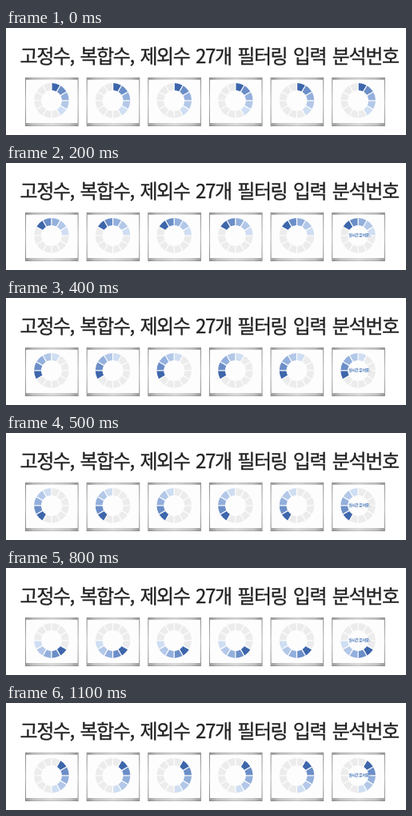
Recreate the animation shown at these times as an HTML page. Size 500 px wide and 134 px high, loop 1200 ms.

```html
<!DOCTYPE html>
<html lang="ko">
<head>
<meta charset="utf-8">
<style>
  html, body { margin: 0; width: 100%; height: 100%; overflow: hidden; background: #fff; }
  svg { display: block; width: 500px; height: 134px; }
  text { font-family: "Noto Sans CJK KR", "Noto Sans CJK", sans-serif; }
  .title {
    font-size: 24px; letter-spacing: -1.4px; word-spacing: 2.3px;
    fill: #222; stroke: #222; stroke-width: .35px;
  }
  .status { font-size: 10px; font-weight: 700; letter-spacing: -1px; fill: #4d7ab8; text-anchor: middle; }
</style>
</head>
<body>
<svg id="stage" viewBox="0 0 500 134">
  <defs>
    <linearGradient id="bar">
      <stop offset="0" stop-color="#858585"/>
      <stop offset=".15" stop-color="#b5b5b5"/>
      <stop offset=".5" stop-color="#d2d2d2"/>
      <stop offset=".85" stop-color="#b5b5b5"/>
      <stop offset="1" stop-color="#858585"/>
    </linearGradient>
    <linearGradient id="side" x2="0" y2="1">
      <stop offset="0" stop-color="#858585"/>
      <stop offset=".5" stop-color="#b4b4b4"/>
      <stop offset="1" stop-color="#858585"/>
    </linearGradient>
  </defs>
  <text class="title" x="17.5" y="43.8">고정수, 복합수, 제외수 27개 필터링 입력 분석번호</text>
</svg>
<script>
const stage = document.getElementById('stage');
const SEGMENTS = 12, STEP = 100, OUTER = 21.8, INNER = 13;
const PITCH = 76.65, WIDTH = 66.6, HEIGHT = 61;
const BLUES = ['#3d66ab', '#6b8ec8', '#93afdc', '#b3c8e8', '#cfdef2'];
const GREY = '#ececec';

function add(parent, tag, attrs, text) {
  const node = document.createElementNS('http://www.w3.org/2000/svg', tag);
  for (const key in attrs) node.setAttribute(key, attrs[key]);
  if (text) node.textContent = text;
  return parent.appendChild(node);
}

function polar(radius, turn) {
  const angle = turn * 2 * Math.PI;
  return `${(radius * Math.sin(angle)).toFixed(2)} ${(-radius * Math.cos(angle)).toFixed(2)}`;
}

// A ring segment whose side gaps keep the same width at both radii.
function wedge(index) {
  const gap = r => 0.65 / (2 * Math.PI * r);
  const from = index / SEGMENTS, to = (index + 1) / SEGMENTS;
  return `M${polar(OUTER, from + gap(OUTER))}A${OUTER} ${OUTER} 0 0 1 ${polar(OUTER, to - gap(OUTER))}` +
    `L${polar(INNER, to - gap(INNER))}A${INNER} ${INNER} 0 0 0 ${polar(INNER, from + gap(INNER))}Z`;
}

const spinners = Array.from({ length: 6 }, (_, i) => {
  const panel = add(stage, 'g', { transform: `translate(${24 + i * PITCH} 62)` });
  const inner = WIDTH - 2;
  add(panel, 'rect', { width: WIDTH, height: HEIGHT, fill: 'url(#side)' });
  add(panel, 'rect', { x: 1, y: 1, width: inner, height: HEIGHT - 2, fill: '#fdfdfd' });
  add(panel, 'rect', { x: 1, y: 0, width: inner, height: 3, fill: 'url(#bar)', opacity: 0.8 });
  add(panel, 'rect', { x: 1, y: 57, width: inner, height: 4, fill: 'url(#bar)', opacity: 0.8 });
  const ring = add(panel, 'g', { transform: 'translate(32.9 28.9)' });
  return Array.from({ length: SEGMENTS }, (_, k) => add(ring, 'path', { d: wedge(k) }));
});

const status = add(stage, 'text',
  { class: 'status', transform: 'translate(442 91.7) scale(.5)' }, '실시간 분석중..');

function draw(time) {
  const step = Math.floor(time / STEP) % SEGMENTS;
  for (const segments of spinners) {
    segments.forEach((segment, k) =>
      segment.setAttribute('fill', BLUES[(k + step) % SEGMENTS] || GREY));
  }
  status.setAttribute('visibility', step ? 'visible' : 'hidden');
}

const start = performance.now();
function tick() {
  draw(performance.now() - start);
  requestAnimationFrame(tick);
}
tick();
</script>
</body>
</html>
```
